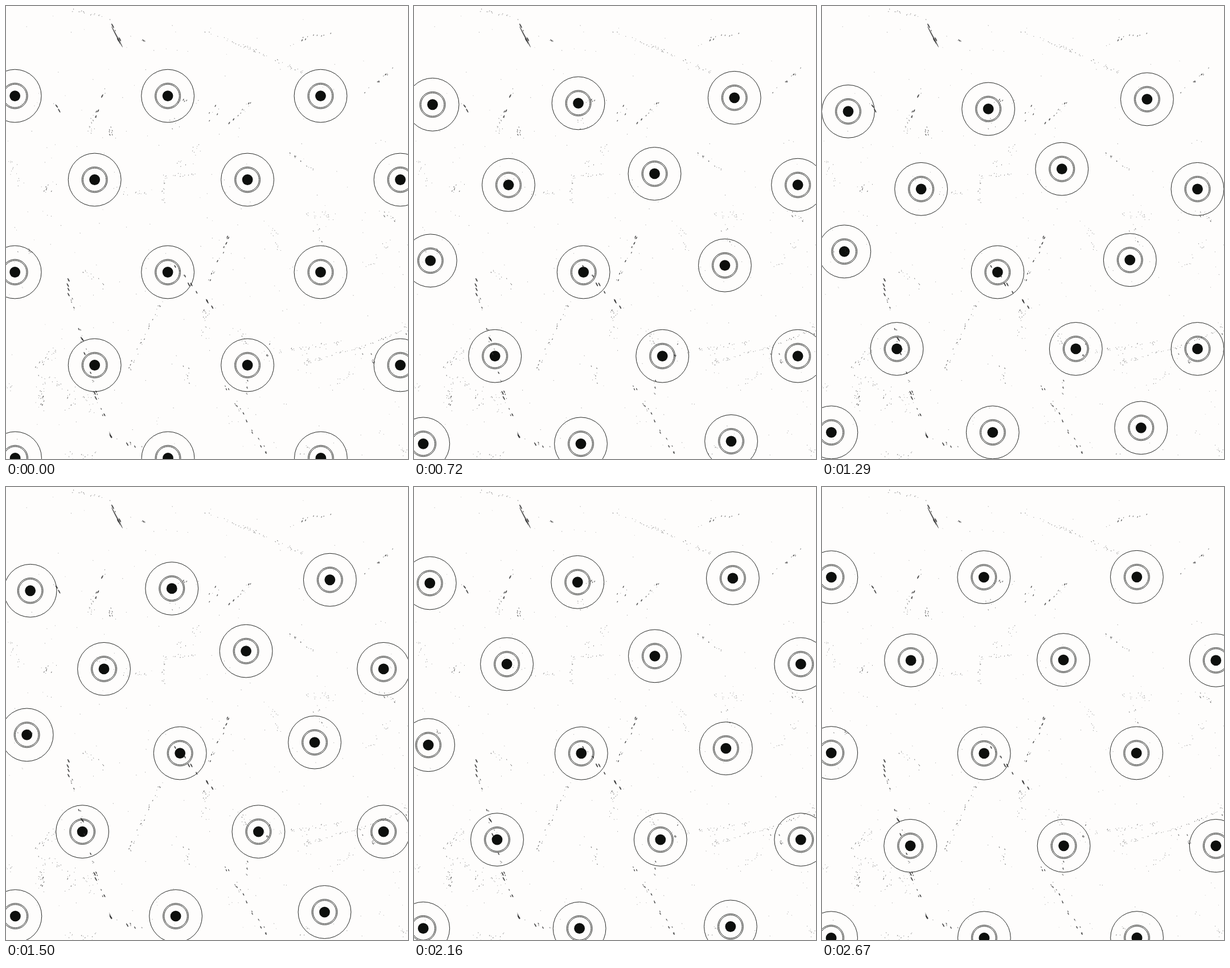
Animation, 706 px wide and 794 px high, one loop 2700 ms. Source, as an HTML page with a canvas:

```html
<!DOCTYPE html>
<html lang="en">
<head>
<meta charset="utf-8">
<title>Drifting discs</title>
<style>
html, body { margin: 0; width: 100%; height: 100%; overflow: hidden; background: #fefdfc; }
canvas { display: block; }
</style>
</head>
<body>
<canvas id="stage" width="706" height="794"></canvas>
<script>
const W = 706, H = 794, LOOP = 2700, TURN = 1320, STEP = 30;
const PITCH = 268.4, LEAN = 1.08;
const stage = document.getElementById('stage');
const ctx = stage.getContext('2d');

// Each row: left and top of its grid line, sag on the way back, drift of its discs
const rows = [
  { x: 15.7, y: 157.6, sag: 0, drift: [[31, 27.8], [8.2, 23.4], [18.8, 5.9]] },
  { x: 155.7, y: 304.5, sag: -1, drift: [[18.8, 16.7], [-2.9, -19.3], [-33.8, 16.7]] },
  { x: 15.7, y: 466.5, sag: 0.4, drift: [[24.1, -37], [24.8, 0], [-12, -21.8]] },
  { x: 155.7, y: 629.5, sag: 0, drift: [[-24.8, -29.2], [22.2, -29.2], [-33.8, -29.2]] },
  { x: 16.1, y: 792.5, sag: -1.2, drift: [[0.3, -46.2], [15.6, -46.2], [7.6, -54.4]] }
];

// Main scratches: longest speck, then the points they run through
const scratches = [
  [9, 181, 22, 205, 73], [8, 235, 48, 246, 69], [8, 173, 147, 157, 200], [8, 82, 167, 96, 192],
  [5, 684, 107, 628, 154], [5, 432, 168, 392, 205], [6, 392, 402, 353, 490],
  [9, 298, 458, 328, 492, 370, 535], [8, 106, 478, 160, 685, 185, 757, 240, 774],
  [3, 272, 520, 215, 640], [2, 475, 607, 590, 589], [2, 510, 629, 625, 598, 706, 566],
  [2, 112, 7, 172, 18], [2, 337, 40, 445, 82, 522, 117], [2, 278, 350, 276, 300, 336, 292],
  [4, 485, 248, 540, 288], [5, 385, 667, 460, 787]
];

function makeRandom(seed) {
  return () => {
    seed = (Math.imul(seed, 1664525) + 1013904223) >>> 0;
    return seed / 4294967296;
  };
}

function makeDust() {
  const layer = document.createElement('canvas');
  layer.width = W;
  layer.height = H;
  const g = layer.getContext('2d');
  const random = makeRandom(41);
  const jitter = amount => (random() + random() - 1) * amount;
  g.fillStyle = '#2e2e2e';

  function speck(x, y, length, angle, alpha) {
    g.globalAlpha = alpha;
    g.beginPath();
    g.ellipse(x, y, length / 2, Math.min(1, 0.4 + length * 0.1), angle, 0, Math.PI * 2);
    g.fill();
  }

  function sprinkle(x1, y1, x2, y2, longest, spread) {
    const dx = x2 - x1, dy = y2 - y1;
    const angle = dx * dy < 0 ? -LEAN : LEAN;
    const count = Math.hypot(dx, dy) / (2.5 + longest * 0.7);
    for (let i = 0; i < count; i++) {
      const at = random();
      const length = 1 + (longest - 1) * random() ** 1.5;
      speck(x1 + dx * at + jitter(spread), y1 + dy * at + jitter(spread),
        length, angle, Math.min(0.85, 0.4 + length * 0.1));
    }
  }

  for (const [longest, ...points] of scratches) {
    for (let i = 0; i + 3 < points.length; i += 2) {
      sprinkle(...points.slice(i, i + 4), longest, 4);
    }
  }
  speck(195, 54, 42, LEAN, 0.8);

  // Stray trails, denser toward the lower left
  for (let i = 0; i < 42; i++) {
    const x = W * random() ** 1.3, y = H * random() ** 0.7;
    const heading = random() * Math.PI, reach = 20 + random() * 40;
    sprinkle(x, y, x + Math.cos(heading) * reach, y + Math.sin(heading) * reach,
      1.5 + 3.5 * random() ** 2, 9);
  }
  for (let i = 0; i < 260; i++) {
    speck(random() * W, H * random() ** 0.8, 1.4, LEAN, 0.2 + random() * 0.3);
  }
  return layer;
}

function circle(x, y, r) {
  ctx.beginPath();
  ctx.arc(x, y, r, 0, Math.PI * 2);
}

function drawDisc(x, y) {
  for (const r of [46.4, 22.4, 20.4]) {
    circle(x, y, r);
    ctx.stroke();
  }
  circle(x, y, 9.4);
  ctx.fill();
}

const dust = makeDust();

function draw(now) {
  const t = Math.floor((now % LOOP) / STEP) * STEP;
  const out = t < TURN;
  const p = out ? t / TURN : (LOOP - t) / (LOOP - TURN);
  ctx.fillStyle = '#fefdfc';
  ctx.fillRect(0, 0, W, H);
  ctx.fillStyle = ctx.strokeStyle = '#0d0f0d';
  ctx.lineWidth = 0.9;
  for (const { x, y, sag, drift } of rows) {
    const offset = out ? 0 : sag * (1 - p);
    drift.forEach(([dx, dy], i) => drawDisc(x + PITCH * i + dx * p, y + dy * p + offset));
  }
  ctx.drawImage(dust, 0, 0);
}

const start = performance.now();
function tick() {
  draw(performance.now() - start);
  requestAnimationFrame(tick);
}
tick();
</script>
</body>
</html>
```
